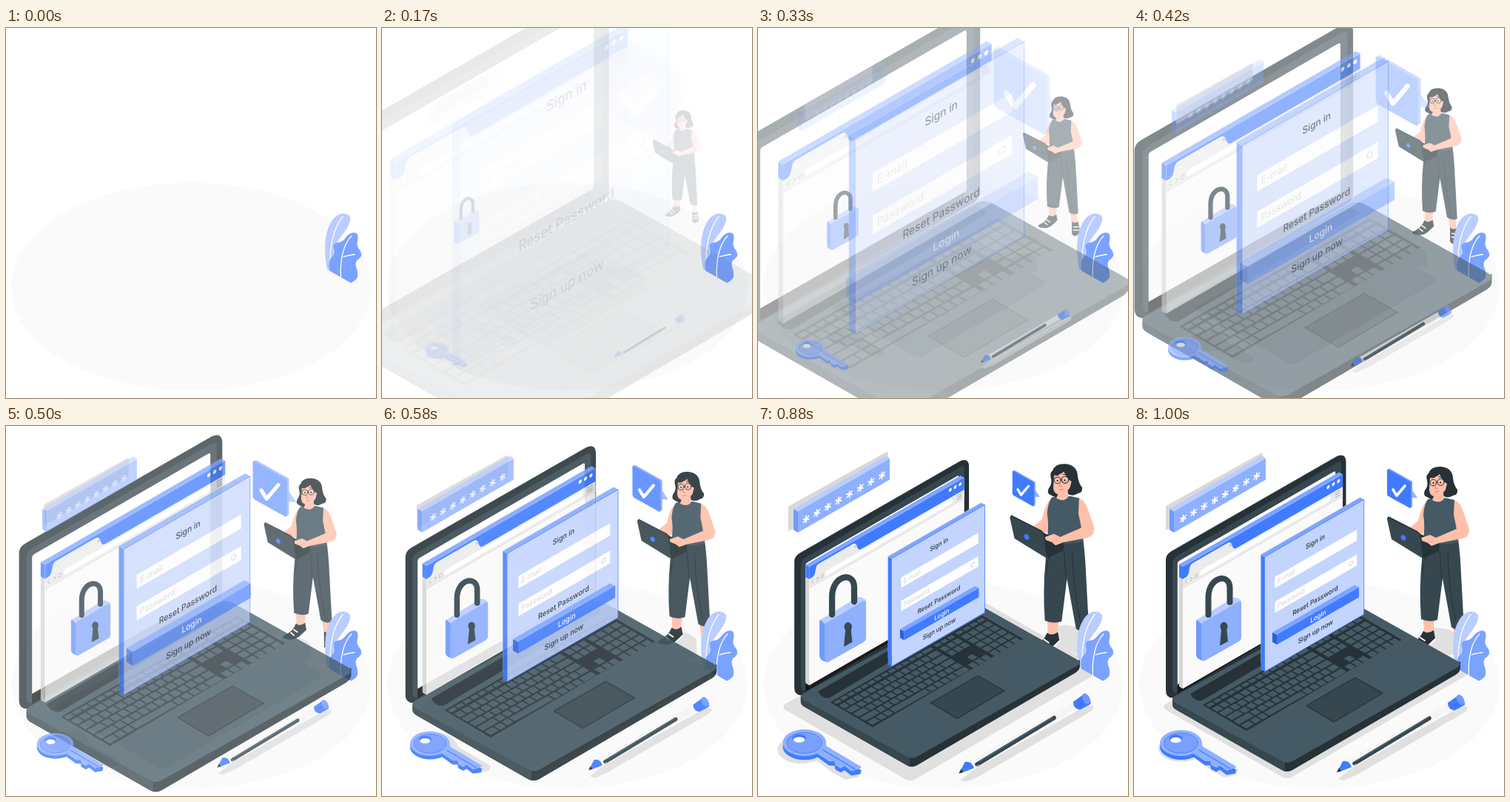
These frames come from a looping animation (500x500 px, 1.04 s). An HTML page:

```html
<!DOCTYPE html>
<html lang="en">
<head>
<meta charset="utf-8">
<title>Sign in</title>
<style>
html, body { margin: 0; width: 100%; height: 100%; overflow: hidden; background: #fff; }
svg { display: block; width: 100vw; height: 100vh; }
text { font-family: Inter, Roboto, sans-serif; font-weight: 500; font-size: 9.3px; fill: #263238; }
.mid { text-anchor: middle; }
.hint { fill: #d2d2d2; font-weight: 400; }
.night { fill: #263238; }
.dark { fill: #37474f; }
.slate { fill: #455a64; }
.blue { fill: #407bff; }
.soft { fill: #8fb0ff; }
.pale { fill: #bacdff; }
.side { fill: #6f99ff; }
.grey { fill: #e0e0e0; }
.skin { fill: #ffc0aa; }
.white { fill: #fff; }
.line { fill: none; stroke-linecap: round; stroke-linejoin: round; }
</style>
</head>
<body>
<!-- data-zoom: centre x, centre y, power of the shrinking zoom, power of the growing zoom, power of the fade -->
<svg viewBox="0 0 500 500">
  <ellipse cx="250.3" cy="349.5" rx="243.7" ry="140.5" fill="#fafafa"/>

  <g class="grey" data-zoom="241 376 0 1 1">
    <path d="M42 376Q38 380 44 384L200 474Q207 478 214 474L449 337Q458 330 449 325L300 240Z"/>
    <path d="M33 437C30 420 70 410 88 425L96 438 141 464 139 471 122 475 104 465 84 450C62 458 36 452 33 437Z"/>
    <path d="M380 288L400 273Q425 270 436 283L437 308 425 310Z"/>
  </g>

  <g data-zoom="398.5 190 0 .9 .8">
    <path class="skin" d="M391 258H406L404 283H392ZM431 270H444L444 297H434Z"/>
    <path class="night" d="M391 277Q397 282 405 276L407 287 396 297Q384 305 372 301L371 296Q386 290 391 277Z"/>
    <path class="line" d="M371 300Q386 306 397 298L407 288M383 291L388 295M387 286L393 290" stroke="#fff" stroke-width="2"/>
    <path class="night" d="M434 289Q440 294 446 289L450 311Q447 318 438 318L434 314Z"/>
    <path class="line" d="M434 314Q440 322 450 311M437 299H446M437 305H447" stroke="#fff" stroke-width="2"/>
    <path class="dark" d="M391 153L438 152Q441 174 442 200L446 274Q438 278 429 272L417 206 410 262Q400 266 388 261Q385 222 389 181Z"/>
    <path class="line" d="M413 168L416 206M424 171Q425 220 435 264M397 170Q390 182 390 200" stroke="#263238" stroke-width="1"/>
    <path class="skin" d="M395 102Q388 109 384 128L372 138 386 149 397 138Z"/>
    <path class="slate" d="M397 99Q414 94 433 100Q439 112 438 157Q414 163 390 155Q394 140 391 120Q392 106 397 99Z"/>
    <path class="night" d="M398 64Q401 54 416 55Q430 57 431 70Q432 80 437 86Q438 93 431 94Q425 98 419 95L408 99Q400 99 396 96Q390 94 393 87Q398 81 396 74Q394 66 398 64Z"/>
    <path class="skin" d="M400 70Q408 70 413 65Q417 75 423 78L421 86 418 90 419 98Q413 106 403 100L405 95Q399 93 399 86Z"/>
    <g class="line" stroke="#263238" stroke-width="1">
      <circle cx="404.4" cy="76.5" r="4.3"/><circle cx="414.5" cy="75.8" r="4.6"/>
      <path d="M408.7 76L410 75.700M419 75L424 75M402 70L406 69.500M412 68.500L416 69"/>
    </g>
    <path class="line" d="M408 79L407 84 410 84.500M407 89Q410 89.500 412 88" stroke="#e57a67" stroke-width="1"/>
    <circle cx="404.5" cy="77" r="1"/><circle cx="414" cy="76.5" r="1"/>
    <path class="night" d="M385 145L413 158 412 169 391 179Z"/>
    <path class="skin" d="M433 100Q441 103 445 116L453 139Q454 149 444 152L413 158 402 162 397 158 389 155 388 151 400 147 408 151 436 139 432 120Z"/>
    <path class="line" d="M398 157L404 155M435 132L436 139" stroke="#e99d88" stroke-width=".8"/>
    <path class="dark" d="M344 123L383 143Q386 145 387 148L391 177Q390 179 387 177L348 153 342 126Q342 123 344 123Z"/>
    <path class="line" d="M344 123L383 143Q386 145 387 148L391 177" stroke="#263238" stroke-width="1.5"/>
    <ellipse class="blue" cx="364" cy="151" rx="3" ry="4" transform="rotate(-35 364 151)"/>
  </g>

  <path class="pale" d="M434 326C429 298 430 273 443 257C452 247 467 250 465 260C463 271 454 279 447 290L442 329Z"/>
  <path class="line" d="M438 324C437 295 442 271 455 255" stroke="#fff" stroke-width="1.2"/>
  <path fill="#7aa2ff" d="M437 328Q435 313 441 309Q446 304 443 298Q441 291 448 290Q455 290 460 282Q467 275 473 277Q477 280 475 288Q473 294 478 300Q483 307 477 312Q471 315 473 323Q476 329 475 337Q472 342 466 344.500Z"/>
  <path class="line" d="M452.500 337C451 311 457 291 467 281M456 309Q463 307 471 306" stroke="#fff" stroke-width="1.3"/>

  <g data-zoom="241.5 252.5 1 0 1">
    <path class="night" fill-rule="evenodd" d="M43 181Q43 174 50 169.500L274 41Q286 36 286.500 48V229Q286 236 280 240L58 367Q43 370 43 357ZM58.500 186Q58.500 183.500 61 182L270 61.500Q272.500 60.500 272.500 63V225Q272.500 228 270 230L60 351.500 58.500 350Z"/>
    <path class="dark" fill-rule="evenodd" d="M52 187Q52 179 59 175L275 49Q280 47 280 53V229Q280 235 275 238L62 360Q52 363 52 354ZM58.500 186Q58.500 183.500 61 182L270 61.500Q272.500 60.500 272.500 63V225Q272.500 228 270 230L60 351.500 58.500 350Z"/>
    <path fill="#1a1a1a" d="M58.500 349.500L270 229V239L58.500 362Z"/>
    <path class="night" d="M52 368V377Q53 381 58 384L200 465Q207 469 214 465L435 336Q441 332 441 327V318L207 454Z"/>
    <path class="dark" d="M52 370L204 455V467L200 465 58 384Q52 381 52 377Z"/>
    <path class="slate" d="M55 365L283 240Q291 236 300 241L436 317Q445 322 436 327L214 453Q207 457 200 453L56 374Q49 370 55 365Z"/>
    <path class="night" d="M76 362L278 245Q286 243 294 251L92 371Q82 373 76 362Z"/>
    <path class="night" d="M93 377L305 256 362 289 152 412Z"/>
    <g id="keys" class="slate" transform="matrix(210 -119 57 33 95 377)"/>
    <path class="dark" d="M233 378L299 340 336 361 270 400Z" stroke="#263238" stroke-width="1.2"/>
  </g>

  <g data-zoom="171.500 209 1 0 1">
    <path fill="#d6d6d6" d="M61 187L66 190V355L61 352Z"/>
    <path class="blue" d="M61 187L66 190V207L61 204Z"/>
    <path fill="#7ea5ff" d="M61 187L277 62.500 282 65.300 66 190Z"/>
    <g transform="matrix(.866 -.5 0 1 66 190)">
      <path fill="#fafafa" d="M0 0H249.500V165H0Z"/>
      <path class="blue" d="M0 0H249.500V17H0Z"/>
      <path fill="#ebebeb" d="M0 17H5Q9 16 10 10Q11 3 15 3H70Q75 3 77 10Q79 17 84 17H249.500V29H0Z"/>
      <path class="white" d="M28 19H229Q232 22.500 229 26H28Q24 22.500 28 19Z"/>
      <path class="line" d="M0 29.500H249.500" stroke="#dcdcdc"/>
      <path class="line" d="M73 7L76 10M76 7L73 10M7 20.500L4 23 7 25.500M12 20.500L15 23 12 25.500" stroke="#bdbdbd"/>
      <circle cx="21" cy="23" r="2.200" fill="none" stroke="#bdbdbd"/>
      <path class="line" d="M238 19.500H245M238 22.500H245M238 25.500H245" stroke="#a8a8a8"/>
      <g class="white"><circle cx="227" cy="6" r="2.300"/><circle cx="235" cy="6" r="2.300"/><circle cx="243" cy="6" r="2.300"/></g>
    </g>
  </g>

  <g data-zoom="114.500 260 0 1 .8">
    <path class="side" d="M84 264Q84 261 87 262L93 267V317Q84 315 84 309Z"/>
    <path class="pale" d="M85 262L134 232Q139 231 145 236L92 268Z"/>
    <path class="soft" d="M91 270Q91 267 94 265L142 237Q145 236 145 239V286Q145 289 142 291L96 317Q91 319 91 314Z"/>
    <path class="line" d="M100.500 255V231C101 203 129.500 198 129.500 219V238" stroke="#37474f" stroke-width="8"/>
    <path class="dark" d="M118 275L125 271 127 291 116 297Z"/>
    <ellipse class="dark" cx="121.500" cy="271" rx="5" ry="6"/>
  </g>

  <g data-zoom="110 90 0 1 1">
    <path fill="#d9d9d9" d="M43 110Q43 108 45 107L171 37Q174 36 174 39V65L43 141Z"/>
  </g>
  <g data-zoom="113 92 1 1 2">
    <path class="side" d="M48 112L54 115.500V144L48 140.500Z"/>
    <path class="pale" d="M48 112L172 40.500Q175 40 178 44L54 115.500Z"/>
    <path class="soft" d="M54 115.500L178 44V72.500L54 144Z"/>
  </g>
  <g id="stars" class="line" data-zoom="113 92 0 1 2" stroke="#fff" stroke-width="1.900"/>

  <g data-zoom="361.500 84 3 0 2">
    <path class="soft" d="M374 84L383 97 373 97Z"/>
    <path class="side" d="M342 59L345 57.500 376 75 376 109 373 111 345 93Z"/>
    <path class="blue" d="M342 60Q342 58 344 59L372 75Q374 76 374 79V109Q374 112 371 110L344 95Q342 94 342 91Z"/>
    <path class="line" d="M350 86L355 94 366 81" stroke="#fff" stroke-width="3.600"/>
  </g>

  <g data-zoom="241 215 2 0 1.4">
    <path class="grey" d="M171.500 173L305 96.500V245L171.500 320Z"/>
    <path class="blue" d="M171.500 174L176.500 177V332L171.500 329Z"/>
    <path fill="#7ea5ff" d="M171.500 174L305.700 96.500 310.700 99.500 176.500 177Z"/>
    <g transform="matrix(.866 -.5 0 1 176.500 177)">
      <path fill="#c3d4ff" stroke="#407bff" stroke-width=".8" d="M0 0H155V155H0Z"/>
      <path class="white" d="M16 35H144V50H16ZM16 68.500H144V83.500H16Z"/>
    </g>
  </g>
  <g data-zoom="241 215 2 0 1">
    <g data-zoom="245.500 255 1 0 1">
      <path fill="#2c5fd6" d="M187 279L193 282V295.500L187 292Z"/>
      <path fill="#7ea5ff" d="M187 279L298 215 304 218 193 282Z"/>
      <path class="blue" d="M193 282L304 218V231.500L193 295.500Z"/>
    </g>
    <g transform="matrix(.866 -.5 0 1 176.500 177)">
      <text class="mid" x="79" y="22">Sign in</text>
      <text class="hint" x="20" y="46">E-mail</text>
      <text class="hint" x="20" y="79.500">Password</text>
      <circle cx="135" cy="76" r="2.700" fill="none" stroke="#d2d2d2"/>
      <text class="mid" x="79" y="101.500">Reset Password</text>
      <text class="mid" x="83.500" y="125" style="fill:#fff">Login</text>
      <text class="mid" x="79.500" y="143.500">Sign up now</text>
    </g>
  </g>

  <g data-zoom="87 441.500 0 1 .8">
    <g class="blue" transform="translate(0 4.500)">
      <ellipse cx="63.500" cy="429" rx="28.500" ry="17.500"/>
      <path d="M78 441L91 432 138 460 137 465 125 467 116 460 111 463 104 459 103 454 96 454Z"/>
    </g>
    <path class="soft" d="M78 441L91 432 138 460 137 462 125 466 116 459 111 462 104 458 103 453 96 453Z"/>
    <ellipse class="soft" cx="63.500" cy="428.500" rx="28.500" ry="17.500"/>
    <ellipse cx="63.500" cy="428.500" rx="23" ry="13.500" fill="#7aa0ff" stroke="#407bff" stroke-width=".8"/>
    <ellipse class="blue" cx="56.500" cy="422.500" rx="9" ry="5.500"/>
    <ellipse class="white" cx="56.500" cy="424.500" rx="7.500" ry="3.700"/>
    <path class="line" d="M88 438L130 463" stroke="#407bff" stroke-width="1.200"/>
  </g>

  <g data-zoom="362 417 0 1 .8">
    <path class="grey" d="M276 477L298 460 440 380 450 379Q452 384 445 388L300 472 283 479Z"/>
    <path class="line" d="M293 456L428 378" stroke="#f5f5f5" stroke-width="10" style="stroke-linecap:butt"/>
    <path class="line" d="M298 456L399 395" stroke="#37474f" stroke-width="5.500"/>
    <path class="line" d="M300 453L397 394.500" stroke="#546e7a" stroke-width="1"/>
    <path class="line" d="M290 449V462L300 457" stroke="#e0e0e0" stroke-width=".8"/>
    <path class="blue" d="M275 467L282 453Q291 451 294 461L281 466Z"/>
    <path class="night" d="M274 468L277 462 280 466.500Z"/>
    <path class="blue" d="M424 374L439 363.500Q447 366 447 377L433 384.500Q424 383 424 374Z"/>
    <ellipse class="side" cx="441" cy="370" rx="4.500" ry="7.500" transform="rotate(-28 441 370)"/>
  </g>
</svg>
<script>
const NS = 'http://www.w3.org/2000/svg';
const add = (parent, tag, attrs) => {
  const el = document.createElementNS(NS, tag);
  for (const name in attrs) el.setAttribute(name, attrs[name]);
  parent.append(el);
};

const keys = document.getElementById('keys');
const key = (u, v, w, h) =>
  add(keys, 'rect', { x: u + .004, y: v + .018, width: w - .008, height: h - .036 });
const rowTop = row => row ? .14 + (row - 1) * .172 : 0;
const rowHeight = row => row ? .172 : .12;

// main block: first key of each row sets the stagger
[1, 1, 1.5, 1.8, 2.3, 1.3].forEach((first, row) => {
  const unit = .655 / 14.5;
  for (let x = 0, n = 0; x < 14.2; n++) {
    let w = n ? 1 : first;
    if (row === 5 && n === 3) w = 5.4;
    if (x + w > 13.4) w = 14.5 - x;
    key(x * unit, rowTop(row), w * unit, rowHeight(row));
    x += w;
  }
});
// navigation keys, arrows and number pad
for (let row = 0; row < 6; row++) {
  for (let col = 0; col < 3; col++) {
    if (row < 3 || row === 5 || (row === 4 && col === 1))
      key(.668 + col * .043, rowTop(row), .043, rowHeight(row));
  }
  for (let col = 0; col < 4; col++)
    key(.81 + col * .047, rowTop(row), .047, rowHeight(row));
}

const stars = document.getElementById('stars');
for (let i = 0; i < 8; i++) {
  add(stars, 'path', {
    d: 'M0-4.200V4.200M-4-2.200L4 2.200M-4 2.200L4-2.200',
    transform: `matrix(.866 -.5 0 1 ${66.5 + i * 14.2} ${125 - i * 8.2})`
  });
}

// cubic-bezier(.36, -.01, .5, 1.38)
const curve = (t, a, b) => 3 * (1 - t) ** 2 * t * a + 3 * (1 - t) * t * t * b + t ** 3;
const ease = x => {
  let lo = 0, hi = 1;
  for (let i = 0; i < 24; i++) {
    const t = (lo + hi) / 2;
    if (curve(t, .36, .5) < x) lo = t; else hi = t;
  }
  return curve(hi, -.01, 1.38);
};

const parts = [...document.querySelectorAll('[data-zoom]')].map(el => {
  const [x, y, shrink, grow, fade] = el.dataset.zoom.split(' ').map(Number);
  return { el, x, y, shrink, grow, fade };
});

const LOOP = 1040, FPS = 24;
const start = performance.now();
function draw(now) {
  const time = Math.max(0, now - start) % LOOP;
  const step = Math.min(FPS, Math.floor((time + 5) * FPS / 1000));
  const p = step < 2 ? 0 : ease(step / FPS);
  const rest = (1 - p) / 2;
  const alpha = Math.min(1, Math.max(0, p));
  for (const { el, x, y, shrink, grow, fade } of parts) {
    const scale = (1 + rest) ** shrink * (1 - rest) ** grow;
    el.setAttribute('transform', `translate(${x} ${y}) scale(${scale}) translate(${-x} ${-y})`);
    el.setAttribute('opacity', alpha ** fade);
  }
  requestAnimationFrame(draw);
}
draw(start);
</script>
</body>
</html>
```
